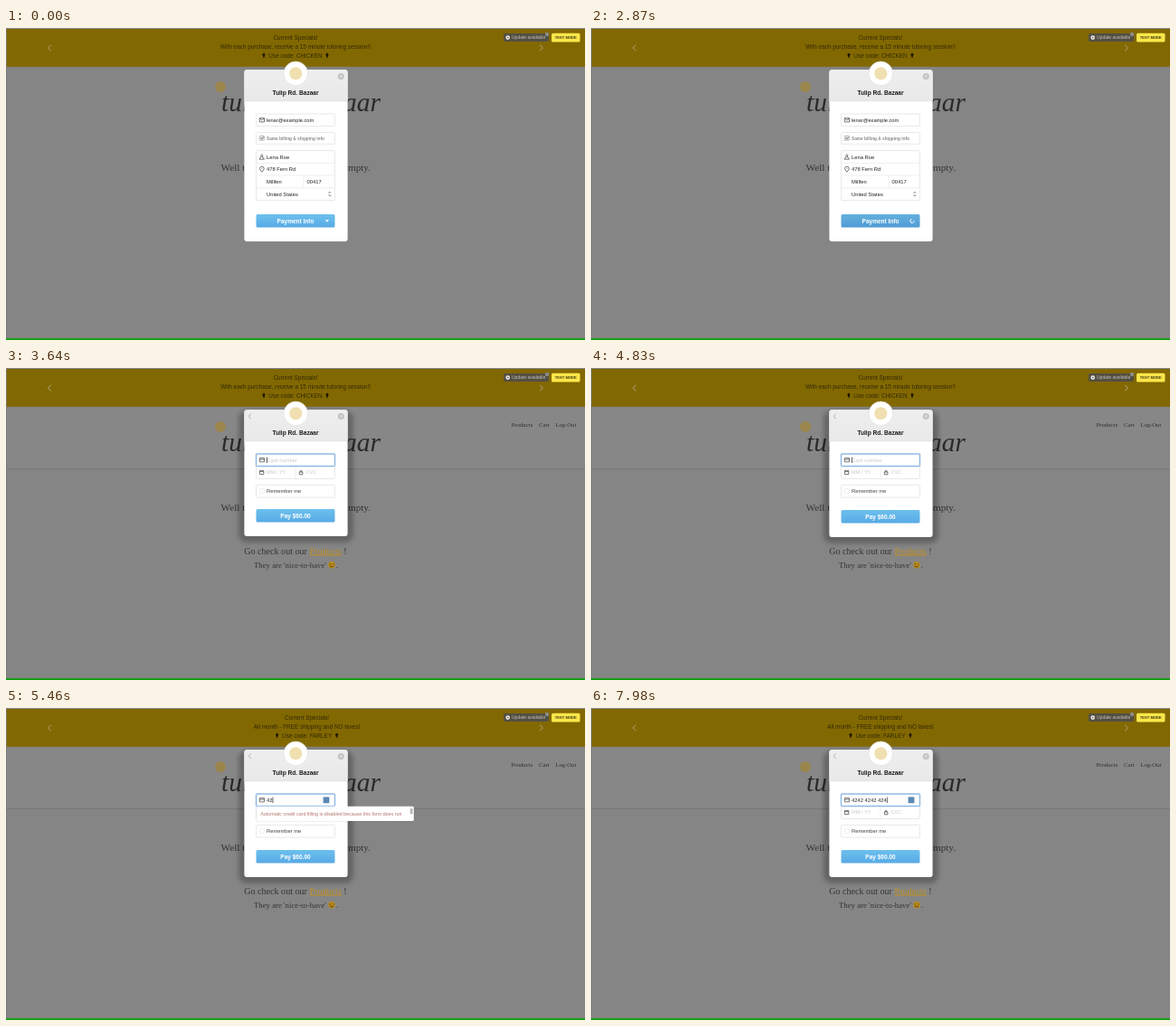
Recreate the animation shown at these times as an HTML page. Size 640 by 345 pixels, loop 8000 ms.

```html
<!DOCTYPE html>
<html lang="en">
<head>
<meta charset="utf-8">
<title>Checkout</title>
<style>
  html, body { margin: 0; width: 100%; height: 100%; overflow: hidden; background: #858585; }
  svg { display: block; width: 640px; height: 345px; }
  text { font-family: "Liberation Sans", Arial, sans-serif; white-space: pre; }
  .serif { font-family: "Liberation Serif", "Times New Roman", serif; }
  .bold { font-weight: 700; }
  .box { fill: #fff; stroke: #e4e4e4; stroke-width: .8; }
  .rule { stroke: #ebebeb; stroke-width: .8; }
  .icon { fill: none; stroke: #555; stroke-width: .8; }
</style>
</head>
<body>
<svg id="stage" viewBox="0 0 640 345" xmlns="http://www.w3.org/2000/svg"></svg>
<script>
const LOOP = 8000, TICK = 70;

// y is the middle of the capitals
const text = (x, y, size, str, fill = '#222', extra = '') =>
  `<text x="${x}" y="${y + size * .35}" font-size="${size}" fill="${fill}" ${extra}>${str}</text>`;
const rect = (x, y, w, h, fill, extra = '') =>
  `<rect x="${x}" y="${y}" width="${w}" height="${h}" fill="${fill}" ${extra}/>`;
const box = (y, h) => `<rect class="box" x="276.5" y="${y}" width="87" height="${h}" rx="1"/>`;
const rule = d => `<path class="rule" d="${d}"/>`;
const icon = d => `<path class="icon" d="${d}"/>`;
const chevron = (x, y, w, h, color, width) =>
  `<path d="M${x + w} ${y - h}L${x} ${y}L${x + w} ${y + h}" fill="none" stroke="${color}" stroke-width="${width}"/>`;
const mid = 'text-anchor="middle"', end = 'text-anchor="end"';
const serif = 'class="serif"', bold = 'class="bold"';

const slide = (id, offer, code, gap) => {
  const ink = '#332a08';
  const mark = x => `<path d="M${x} 27.6l1.8 2-1 1.3v1.8h-1.6v-1.8l-1-1.3z" fill="#1d1804"/>`;
  return `<g id="${id}">` +
    text(320, 10.3, 6.4, 'Current Specials!', ink, mid) +
    text(320, 20.3, 6.4, offer, ink, mid) +
    text(320, 30.5, 6.4, 'Use code: ' + code, ink, mid) +
    mark(320 - gap) + mark(320 + gap) + '</g>';
};

const page =
  rect(0, 0, 640, 345, '#858585') +
  rect(0, 0, 640, 43, '#826800') +
  rect(0, 42.6, 640, .7, '#86764a') + rect(0, 0, 640, 1, '#83858a') +
  slide('slideA', 'With each purchase, receive a 15 minute tutoring session!!', 'CHICKEN', 35) +
  slide('slideB', 'All month - FREE shipping and NO taxes!', 'FARLEY', 33) +
  chevron(46.5, 22, 3.2, 3.4, '#a08c4c', 1.3) + chevron(593.3, 22, -3.2, 3.4, '#a08c4c', 1.3) +
  `<g id="header">` +
    rect(0, 43.3, 640, 67.7, '#878787') + rect(0, 111, 640, .8, '#757575') +
    text(558.5, 62.5, 6.8, 'Products', '#303030', serif) +
    text(589, 62.5, 6.8, 'Cart', '#303030', serif) +
    text(607.5, 62.5, 6.6, 'Log-Out', '#303030', serif) + '</g>' +
  text(326, 81.7, 29.5, 'tulip rd bazaar', '#2a2a2a', `class="serif" font-style="italic" ${mid}`) +
  '<circle cx="237" cy="65" r="6" fill="#9a854c"/>' +
  text(237.5, 154, 11.2, 'Well this is nice,', '#353535', serif) +
  text(403, 154, 11.2, 'it is empty.', '#353535', `${serif} ${end}`) +
  text(263.2, 202, 10.1, 'Go check out our <tspan fill="#bd9024" text-decoration="underline">Products</tspan> !', '#353535', serif) +
  text(274, 218, 8.75, "They are 'nice-to-have'", '#353535', serif) +
  '<circle cx="360" cy="217.8" r="3.8" fill="#b98a1c"/>' +
  '<path d="M357.7 217l1.4-.3M361.5 217h.9M357.9 219q2 2 4 0" stroke="#3d2c05" stroke-width=".8" fill="none"/>' +
  text(364.8, 218, 8.75, '.', '#353535', serif) +
  rect(0, 0, .8, 345, '#7b7b7b') + rect(0, 343.2, 640, 1.8, '#08a008');

const badges =
  rect(550, 6, 50, 9, '#544f42', 'rx="2"') +
  '<circle cx="554.7" cy="10.6" r="2.3" fill="#eee"/><circle cx="554.7" cy="10.6" r=".8" fill="#544f42"/>' +
  text(559, 10.6, 5, 'Update available', '#c4c2ba') +
  '<circle cx="598" cy="7" r="2.2" fill="#8b8b88"/>' +
  rect(603, 5.8, 31.5, 9.8, '#fbe64a', 'rx="1.5"') +
  text(618.8, 10.7, 4.15, 'TEST MODE', '#3b3510', `${bold} ${mid}`);

const addressForm = '<g id="address">' +
  box(95, 13.5) + icon('M280.3 99.7h5.2v4.2h-5.2zl2.6 2.3 2.6-2.3') +
  text(288, 101.8, 5.7, 'lenar@example.com') +
  box(115.5, 12.8) +
  rect(280.2, 119, 5.4, 5.4, '#ddd', 'rx="1" stroke="#aaa" stroke-width=".6"') +
  icon('M281.5 121.7l1.1 1.2 2-2.4') +
  text(288, 122, 4.75, 'Same billing &amp; shipping info', '#8b8b8b', bold) +
  box(135.5, 55) + rule('M277 149.4h86M277 163h86M277 176.8h86M329 163v13.8') +
  icon('M280.2 145.2q.2-2 2-2.2q-1.2-3 .6-3.2q1.8.2.6 3.2q1.8.2 2 2.2z') +
  icon('M282.9 159.2q-2.3-2.4-2.3-3.7a2.3 2.3 0 0 1 4.6 0q0 1.3-2.3 3.7zM282.5 155.5h.8') +
  text(288, 142.6, 5.8, 'Lena Roe') + text(288, 156.2, 5.8, '478 Fern Rd') +
  text(288, 170, 5.8, 'Millfen') + text(332.5, 170, 5.8, '00417') +
  text(288, 183.7, 5.8, 'United States') +
  icon('M356.6 182.6l1.2-1.4 1.2 1.4M356.6 184.6l1.2 1.4 1.2-1.4') + '</g>';

const cardForm = '<g id="card">' +
  box(95, 27.5) + rule('M277 108.7h86M320 108.7v13.6') +
  '<g id="focus" fill="none" stroke="#7fb0e2"><rect x="276.5" y="95" width="87" height="13.5" rx="1" stroke-width="2" opacity=".3"/>' +
  '<rect x="276.5" y="95" width="87" height="13.5" rx="1" stroke-width=".9"/></g>' +
  icon('M280.3 99.6h5.2v4.2h-5.2zM280.3 101.1h5.2') +
  icon('M280.4 113.4h4.4v4.2h-4.4zM280.4 114.6h4.4') +
  icon('M324.3 115h3.6v2.8h-3.6zM325 115v-1q1.1-1.6 2.2 0v1') +
  text(288, 101.8, 5.8, 'Card number', '#c9c9c9', 'id="hint"') +
  text(288, 101.8, 5.8, '', '#222', 'id="digits"') +
  rect(288, 98.6, .7, 6.4, '#222', 'id="caret"') +
  rect(350.6, 98.4, 6.8, 6.8, '#5c88b4', 'id="brand"') +
  text(288, 115.4, 5.6, 'MM / YY', '#c9c9c9') + text(331.5, 115.4, 5.6, 'CVC', '#c9c9c9') +
  box(129.3, 13.8) + rect(280.4, 133.6, 5, 5, '#fff', 'rx="1" stroke="#e2e2e2" stroke-width=".6"') +
  text(288, 136.3, 5.8, 'Remember me', '#444') + '</g>';

const modal =
  '<rect id="shadow" x="257" y="47" width="127" rx="9" fill="#000" filter="url(#blur)"/>' +
  '<rect id="panel" x="263.4" y="46.3" width="114.2" rx="3" fill="#fff"/>' +
  '<path d="M263.4 81V49.3a3 3 0 0 1 3-3h108.2a3 3 0 0 1 3 3V81z" fill="url(#top)"/>' +
  rect(263.4, 80.6, 114.2, .6, '#dcdcdc') +
  '<circle cx="320.3" cy="50.3" r="13.3" fill="#fff" stroke="#dcdcdc" stroke-width=".6"/>' +
  '<circle cx="320.3" cy="50.3" r="7" fill="#f0dfb0"/>' +
  text(320, 71.5, 6.6, 'Tulip Rd. Bazaar', '#1c1c1c', `${bold} ${mid}`) +
  '<circle cx="370.3" cy="53.4" r="3.5" fill="#c2c2c2"/>' +
  '<path d="M369 52.1l2.6 2.6m0-2.6l-2.6 2.6" stroke="#eee" stroke-width=".9"/>' +
  `<g id="back">${chevron(268.4, 53.3, 2.2, 2.8, '#aaa', .9)}</g>` +
  addressForm + cardForm +
  '<g id="button">' +
    rect(276.5, 206, 87, 14.6, 'url(#blue)', 'rx="1.5"') +
    rect(276.5, 206, 87, 14.6, '#125', 'id="press" rx="1.5"') +
    '<g id="next">' + text(320, 213.4, 6.5, 'Payment Info', '#fff', `${bold} ${mid}`) +
      '<path id="arrow" d="M353 212h4l-2 2.8z" fill="#fff"/>' +
      '<circle id="spin" cx="355" cy="213.4" r="2.1" fill="none" stroke="#fff" stroke-width=".9" stroke-dasharray="9 4.2"/></g>' +
    '<g id="pay">' + text(320, 213.4, 6.5, 'Pay $60.00', '#fff', `${bold} ${mid}`) + '</g></g>' +
  '<g id="popup">' + rect(276.5, 109, 174.6, 16.5, '#000', 'opacity=".12" rx="1.5"') +
    rect(276.8, 108.8, 174, 16.2, '#fff', 'rx="1.5"') +
    text(281.3, 117.2, 5.34, 'Automatic credit card filling is disabled because this form does not', '#b5726a') +
    rect(446.8, 111, 2.6, 6.5, '#b5b5b5', 'rx="1.2"') + '</g>';

const defs = '<defs><filter id="blur" x="-20%" y="-20%" width="140%" height="140%"><feGaussianBlur stdDeviation="2.8"/></filter>' +
  '<linearGradient id="top" x2="0" y2="1"><stop stop-color="#eee"/><stop offset="1" stop-color="#e9e9e9"/></linearGradient>' +
  '<linearGradient id="blue" x2="0" y2="1"><stop stop-color="#6cc0ee"/><stop offset="1" stop-color="#58aae4"/></linearGradient></defs>';

document.getElementById('stage').innerHTML = defs + page + badges + modal;

const $ = id => document.getElementById(id);
const set = (id, attrs) => { for (const k in attrs) $(id).setAttribute(k, attrs[k]); };
const show = (id, on) => set(id, { opacity: +on });
const move = (id, x, y = 0) => set(id, { transform: `translate(${x} ${y})` });

// piecewise linear value at time t
function track(t, keys) {
  if (t <= keys[0][0]) return keys[0][1];
  for (let i = 1; i < keys.length; i++) {
    const [t0, a] = keys[i - 1], [t1, b] = keys[i];
    if (t < t1) return a + (b - a) * (t - t0) / (t1 - t0);
  }
  return keys[keys.length - 1][1];
}

// cubic-bezier(.42, 0, .58, 1)
function easeInOut(x) {
  x = Math.min(1, Math.max(0, x));
  let lo = 0, hi = 1;
  for (let i = 0; i < 20; i++) {
    const s = (lo + hi) / 2, r = 1 - s;
    if (3 * r * r * s * .42 + 3 * r * s * s * .58 + s * s * s < x) lo = s; else hi = s;
  }
  return lo * lo * (3 - 2 * lo);
}

const NUMBER = '4242 4242 424';
// time and length of the typed number
const KEYS = [[5040, 1], [5320, 2], [5740, 3], [6440, 4], [6790, 6], [6930, 7],
  [7000, 8], [7140, 9], [7350, 11], [7630, 12], [7910, 13]];

function draw(now) {
  const t = Math.floor(now % LOOP / TICK) * TICK;

  const shift = 640 * easeInOut((t - 4920) / 600);
  move('slideA', -shift);
  move('slideB', 640 - shift);

  const clean = t >= 2940;
  show('header', clean);
  set('shadow', { opacity: clean ? .24 : 0 });

  const bottom = track(t, [[3010, 236], [3290, 216], [3570, 187.5], [3640, 186], [3780, 187]]);
  set('panel', { height: bottom - 46.3 });
  set('shadow', { height: bottom - 40 });
  move('button', 0, bottom - 236);

  move('address', track(t, [[3010, 0], [3290, -9], [3430, -14]]));
  show('address', track(t, [[3010, 1], [3290, .14], [3430, 0]]));
  move('card', track(t, [[3010, 16], [3290, 3.6], [3500, 0]]));
  show('card', track(t, [[3080, 0], [3290, .5], [3500, 1]]));
  show('next', track(t, [[3010, 1], [3290, .4], [3430, 0]]));
  show('pay', track(t, [[3080, 0], [3290, .75], [3430, 1]]));
  show('back', track(t, [[3290, 0], [3500, 1]]));

  const busy = t >= 2100 && t < 2940;
  set('press', { opacity: busy ? .1 : 0 });
  show('arrow', !busy);
  show('spin', busy);
  set('spin', { transform: `rotate(${(t - 2100) * .45} 355 213.4)` });

  const typed = KEYS.reduce((n, [at, len]) => t >= at ? len : n, 0);
  const value = NUMBER.slice(0, typed);
  $('digits').textContent = value;
  show('hint', !typed);
  show('focus', t >= 3430);
  show('caret', t >= 3430 && !(t >= 4270 && t < 4620));
  const width = [...value].reduce((w, c) => w + (c === ' ' ? .278 : .556), 0) * 5.8;
  set('caret', { x: 288.2 + width });
  show('brand', typed > 0);
  move('brand', track(t, [[5040, -2.5], [5110, -1.8], [5250, 0]]));
  show('popup', t >= 4900 && t < 5740);
}

function frame() {
  draw(performance.now());
  requestAnimationFrame(frame);
}
frame();
</script>
</body>
</html>
```
